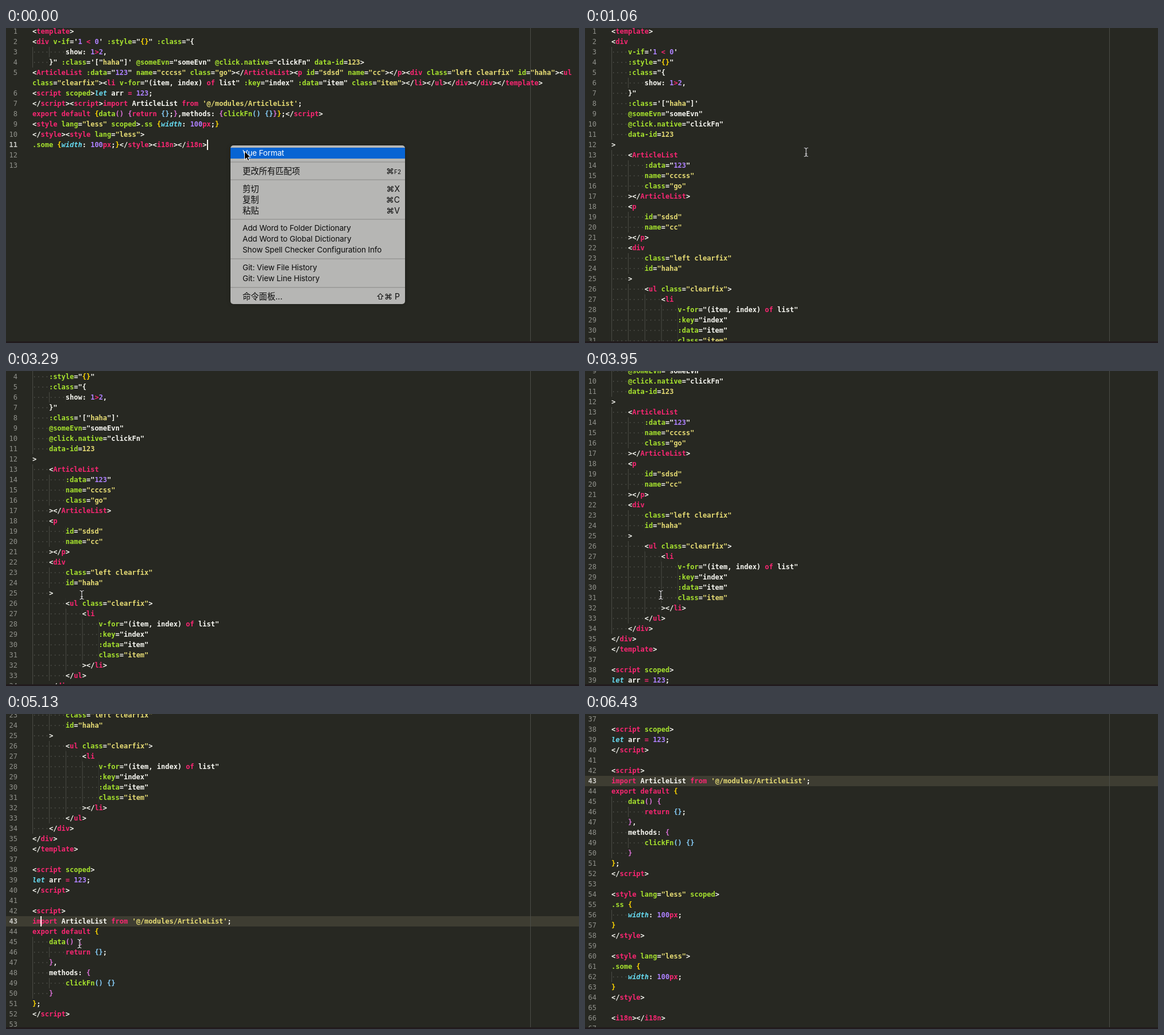
Animation, 998 px wide and 550 px high, one loop 6.91 s. Source, as an HTML page:

```html
<!DOCTYPE html>
<html lang="en">
<head>
<meta charset="utf-8">
<title>Vue formatting in an editor</title>
<style>
  html, body { margin: 0; width: 100%; height: 100%; overflow: hidden; background: #272822; }
  #stage { position: relative; width: 998px; height: 550px; overflow: hidden; background: #272822; }
  #stage * { box-sizing: border-box; }

  .doc {
    position: absolute; left: 0; top: -3px; width: 998px;
    font: bold 12px/18px "DejaVu Sans Mono", monospace; white-space: pre; color: #f8f8f2;
  }
  .line { position: relative; height: 18px; padding-left: 46px; }
  .num { position: absolute; left: 0; width: 20px; text-align: right; font-weight: normal; color: #90918b; }
  .active .num { font-weight: bold; color: #c8c8c4; }
  #after .active { background: #3e3d32; }
  .indent {
    display: inline-block; height: 18px; vertical-align: top; font-weight: normal; color: #4b4c46;
    background: linear-gradient(90deg, #4a4b45 1px, transparent 1px) 0 0 / 4ch 100%;
  }
  .p { color: #f92672; }
  .g { color: #a6e22e; }
  .y { color: #e6db74; }
  .v { color: #ae81ff; }
  .b { color: #66d9ef; font-style: italic; }
  .o { color: #ffd700; }
  .m { color: #da70d6; }
  .s { color: #87cefa; }
  .caret { position: absolute; top: 0; width: 2px; height: 18px; background: #f8f8f0; }
  #before .caret { left: 350px; }
  #after .caret { left: 60px; }
  #ruler { position: absolute; left: 913px; top: 0; width: 1px; height: 550px; background: #4b4c47; }
  #edge { position: absolute; left: 0; bottom: 0; width: 998px; height: 3px; background: #211b1d; }

  #menu {
    position: absolute; left: 391px; top: 205px; width: 304px; height: 277px; padding: 4px 0;
    border-radius: 5px; background: #b6b6b4; box-shadow: 0 0 6px rgba(0, 0, 0, .25);
    font: 13.5px/19px Inter, "Noto Sans CJK SC", "Noto Sans CJK", sans-serif;
    letter-spacing: -.12px; color: #0c0c0c;
  }
  .item { position: relative; height: 19px; padding-left: 21px; white-space: pre; }
  .item.zh { font-size: 14.3px; letter-spacing: 0; }
  .item.on { color: #fff; background: #0764d3; }
  .key { position: absolute; right: 9px; top: 0; font: 14px/19px Inter, "DejaVu Sans", sans-serif; }
  .key small { font-size: 10px; }
  .sep { height: 12px; padding: 5px 0; }
  .sep::after { content: ""; display: block; height: 2px; background: rgba(0, 0, 0, .13); }

  #mouse { position: absolute; left: 0; top: 0; width: 1px; height: 1px; overflow: visible; }

  #before, #after, #menu, .item.on, #mouse, #arrow, #beam, #after .caret {
    animation: 6910ms step-end infinite;
  }
  #before, #arrow { animation-name: leave; }
  #after { animation-name: enter, scroll; }
  #beam { animation-name: enter; }
  #menu { animation-name: fade; }
  .item.on { animation-name: flash; }
  #after .caret { animation-name: blink; }
  #mouse { animation-name: move; animation-timing-function: linear; }

  @keyframes leave { 0% { visibility: visible; } 14.03%, 100% { visibility: hidden; } }
  @keyframes enter { 0% { visibility: hidden; } 14.03%, 100% { visibility: visible; } }
  @keyframes flash {
    0%, 8.68%, 100% { color: #fff; background: #0764d3; }
    7.81% { color: #0c0c0c; background: transparent; }
  }
  @keyframes fade {
    0% { opacity: 1; }
    9.84% { opacity: .81; }
    10.7% { opacity: .4; }
    11.57%, 100% { opacity: 0; }
  }
  @keyframes scroll {
    0% { transform: translateY(0); }
    45.87% { transform: translateY(-50px); }
    50.21% { transform: translateY(-100px); }
    57.16% { transform: translateY(-150px); }
    58.03% { transform: translateY(-200px); }
    59.76% { transform: translateY(-250px); }
    66.56% { transform: translateY(-300px); }
    70.18% { transform: translateY(-350px); }
    74.24% { transform: translateY(-400px); }
    75.97% { transform: translateY(-450px); }
    76.7% { transform: translateY(-500px); }
    77.56% { transform: translateY(-550px); }
    78.43% { transform: translateY(-600px); }
    79.3%, 100% { transform: translateY(-645px); }
  }
  @keyframes blink {
    0%, 71.34%, 85.81% { opacity: 1; }
    64.1%, 78.58%, 93.05%, 100% { opacity: 0; }
  }
  @keyframes move {
    0%, 14.03% { transform: translate(415px, 215px); }
    23.87% { transform: translate(193px, 228px); }
    26.77% { transform: translate(160px, 150px); }
    29.66% { transform: translate(113px, 79px); }
    31.83% { transform: translate(92px, 67px); }
    34.73%, 35.6% { transform: translate(74px, 89px); }
    40.52% { transform: translate(88px, 230px); }
    45%, 66.56% { transform: translate(132px, 391px); }
    70.18%, 81.91% { transform: translate(128px, 401px); }
    86.83% { transform: translate(420px, 440px); }
    92.18%, 100% { transform: translate(1012px, 570px); }
  }
</style>
</head>
<body>
<div id="stage">
  <div class="doc" id="before"></div>
  <div class="doc" id="after"></div>
  <div id="ruler"></div>
  <div id="edge"></div>
  <div id="menu">
    <div class="item on">Vue Format</div>
    <div class="sep"></div>
    <div class="item zh">更改所有匹配项<span class="key" style="right:7px">⌘<small>F2</small></span></div>
    <div class="sep"></div>
    <div class="item zh">剪切<span class="key">⌘X</span></div>
    <div class="item zh">复制<span class="key">⌘C</span></div>
    <div class="item zh">粘贴<span class="key">⌘V</span></div>
    <div class="sep"></div>
    <div class="item">Add Word to Folder Dictionary</div>
    <div class="item">Add Word to Global Dictionary</div>
    <div class="item">Show Spell Checker Configuration Info</div>
    <div class="sep"></div>
    <div class="item">Git: View File History</div>
    <div class="item">Git: View Line History</div>
    <div class="sep"></div>
    <div class="item zh">命令面板...<span class="key">⇧⌘ P</span></div>
  </div>
  <svg id="mouse">
    <path id="arrow" d="M.5 0V15L4 11.8L6.3 17L8.8 16L6.5 10.8H11Z" fill="#000" stroke="#fff"/>
    <g id="beam" fill="none">
      <path d="M-3.5-7.5Q0-7.5 0-4.5Q0-7.5 3.5-7.5M0-5V5M-3.5 7.5Q0 7.5 0 4.5Q0 7.5 3.5 7.5M-2 3H2" stroke="#111" stroke-width="2.4"/>
      <path d="M-3.5-7.5Q0-7.5 0-4.5Q0-7.5 3.5-7.5M0-5V5M-3.5 7.5Q0 7.5 0 4.5Q0 7.5 3.5 7.5M-2 3H2" stroke="#f4f4f4" stroke-width="1.1"/>
    </g>
  </svg>
</div>
<script>
  // "~x" switches to colour class x; a leading "^" marks a wrapped row.
  const before = `<~ptemplate~w>
<~pdiv ~gv-if~w='~v1 ~p< ~v0~w' ~g:style~w="~o{}~w" ~g:class~w="{
        show: ~v1~p>~v2~w,
    }" ~g:class~w='["~yhaha~w"]' ~g@someEvn~w="someEvn" ~g@click.native~w="clickFn" ~gdata-id~w=~y123~w>
<~pArticleList ~g:data~w="~v123~w" ~gname~w=~y"cccss" ~gclass~w=~y"go"~w></~pArticleList~w><~pp ~gid~w=~y"sdsd" ~gname~w=~y"cc"~w></~pp~w><~pdiv ~gclass~w=~y"left clearfix" ~gid~w=~y"haha"~w><~pul
^~gclass~w=~y"clearfix"~w><~pli ~gv-for~w="(item, index) ~pof~w list" ~g:key~w="index" ~g:data~w="item" ~gclass~w=~y"item"~w></~pli~w></~pul~w></~pdiv~w></~pdiv~w></~ptemplate~w>
<~pscript ~gscoped~w>~blet~w arr ~p= ~v123~w;
</~pscript~w><~pscript~w>~pimport~w ArticleList ~pfrom ~y'@/modules/ArticleList'~w;
~pexport default ~o{~gdata~m() {~preturn ~s{}~w;~m}~w,methods: ~m{~gclickFn~s() {}~m}~o}~w;</~pscript~w>
<~pstyle ~glang~w=~y"less" ~gscoped~w>~g.ss ~o{~bwidth~w: ~v100~ppx~w;~o}
</~pstyle~w><~pstyle ~glang~w=~y"less"~w>
~g.some ~o{~bwidth~w: ~v100~ppx~w;~o}~w</~pstyle~w><~pi18n~w></~pi18n~w>

`;

  const after = `<~ptemplate~w>
<~pdiv
    ~gv-if~w='~v1 ~p< ~v0~w'
    ~g:style~w="~o{}~w"
    ~g:class~w="{
        show: ~v1~p>~v2~w,
    }"
    ~g:class~w='["~yhaha~w"]'
    ~g@someEvn~w="someEvn"
    ~g@click.native~w="clickFn"
    ~gdata-id~w=~y123
>
    <~pArticleList
        ~g:data~w="~v123~w"
        ~gname~w=~y"cccss"
        ~gclass~w=~y"go"
    ></~pArticleList~w>
    <~pp
        ~gid~w=~y"sdsd"
        ~gname~w=~y"cc"
    ></~pp~w>
    <~pdiv
        ~gclass~w=~y"left clearfix"
        ~gid~w=~y"haha"
    >
        <~pul ~gclass~w=~y"clearfix"~w>
            <~pli
                ~gv-for~w="(item, index) ~pof~w list"
                ~g:key~w="index"
                ~g:data~w="item"
                ~gclass~w=~y"item"
            ></~pli~w>
        </~pul~w>
    </~pdiv~w>
</~pdiv~w>
</~ptemplate~w>

<~pscript ~gscoped~w>
~blet~w arr ~p= ~v123~w;
</~pscript~w>

<~pscript~w>
~pimport~w ArticleList ~pfrom ~y'@/modules/ArticleList'~w;
~pexport default ~o{
    ~gdata~m() {
        ~preturn ~s{}~w;
    ~m}~w,
    methods: ~m{
        ~gclickFn~s() {}
    ~m}
~o}~w;
</~pscript~w>

<~pstyle ~glang~w=~y"less" ~gscoped~w>
~g.ss ~o{
    ~bwidth~w: ~v100~ppx~w;
~o}
</~pstyle~w>

<~pstyle ~glang~w=~y"less"~w>
~g.some ~o{
    ~bwidth~w: ~v100~ppx~w;
~o}
</~pstyle~w>

<~pi18n~w></~pi18n~w>
`;

  function add(parent, tag, cls, text = '') {
    const el = document.createElement(tag);
    el.className = cls;
    el.textContent = text;
    return parent.appendChild(el);
  }

  function fill(id, code, activeLine) {
    const doc = document.getElementById(id);
    let count = 0;
    for (const row of code.split('\n')) {
      const wrapped = row[0] === '^';
      const line = add(doc, 'div', 'line');
      if (!wrapped) add(line, 'span', 'num', ++count);
      const text = wrapped ? row.slice(1) : row;
      const body = text.trimStart();
      const depth = text.length - body.length;
      if (depth) add(line, 'span', 'indent', '·'.repeat(depth));
      ('w' + body).split('~').forEach(part => add(line, 'span', part[0], part.slice(1)));
      if (count === activeLine) {
        line.classList.add('active');
        add(line, 'span', 'caret');
      }
    }
  }

  fill('before', before, 11);
  fill('after', after, 43);
</script>
</body>
</html>
```
